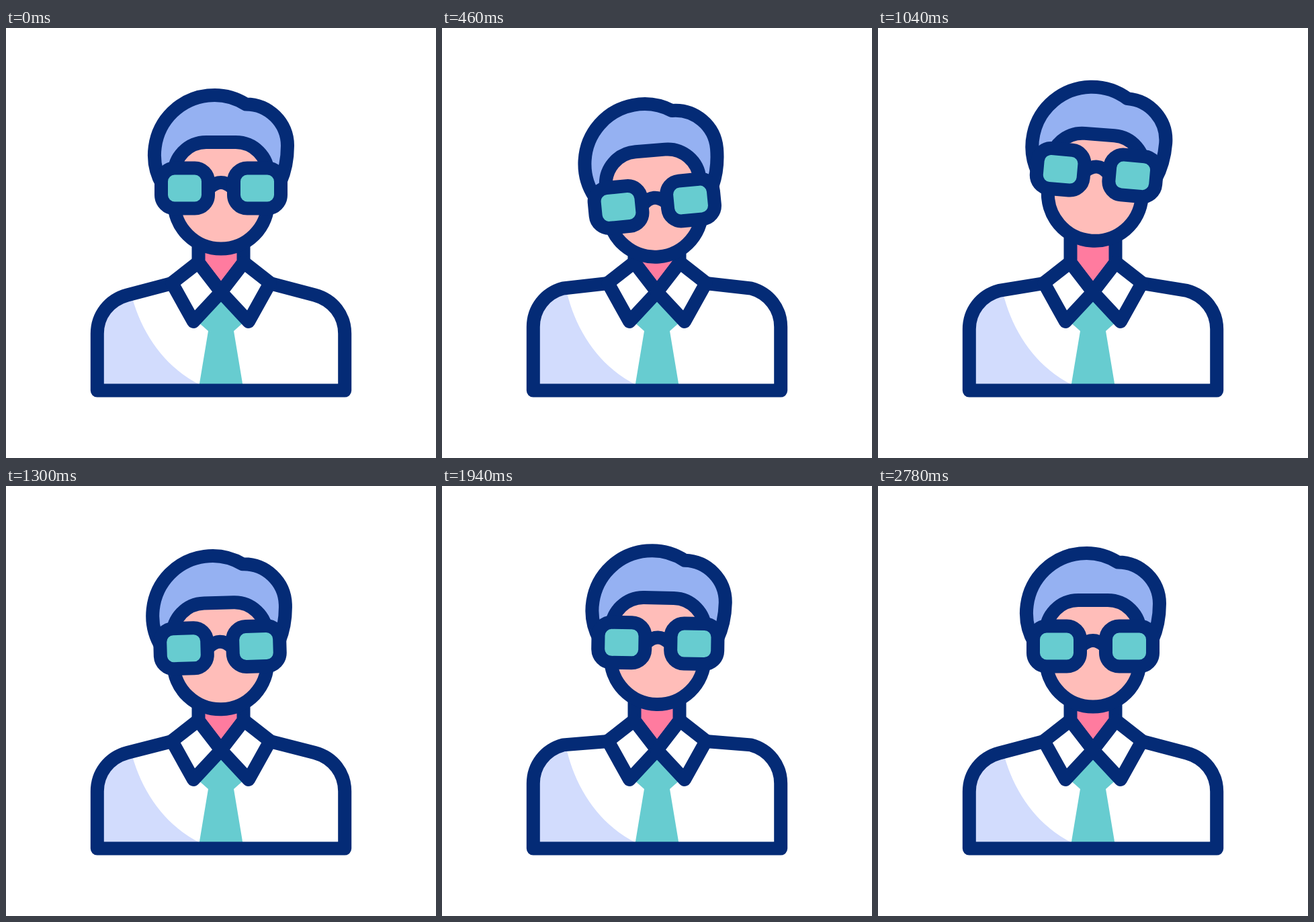
These frames come from a looping animation (640x640 px, 3.6 s). An HTML page:

```html
<!DOCTYPE html>
<html lang="en">
<head>
<meta charset="utf-8">
<title>Man with glasses</title>
<style>
html, body { margin: 0; width: 100%; height: 100%; overflow: hidden; background: #fff; }
svg { display: block; width: 100vw; height: 100vh; }
.line { stroke: #042b76; stroke-width: 20; stroke-linecap: round; stroke-linejoin: round; }
</style>
</head>
<body>
<svg viewBox="0 0 640 640">
  <defs>
    <clipPath id="clip"><path id="bodyClip"/></clipPath>
  </defs>
  <path fill="#d2dcfd" clip-path="url(#clip)" d="M184 385C196 445 232 504 291 532V545H130V385Z"/>
  <path fill="#67ccd0" d="M320 393L284 436L301 451L287 535H353L339 451L356 436Z"/>
  <path id="body" class="line" fill="none"/>
  <path class="line" fill="#ff7b9f" d="M286.5 300V349L320 393L353.5 349V300"/>
  <path class="line" fill="#fff" d="M286 349L247 379.5L279 437L320 393Z"/>
  <path class="line" fill="#fff" d="M354 349L393 379.5L361 437L320 393Z"/>
  <g id="head">
    <path class="line" fill="#95b1f2" d="M233.2 234A89 89 0 0 1 357 113.4A62 62 0 0 1 419 175C419 198 415 214 408 230"/>
    <path class="line" fill="#ffbdb9" d="M250 218A48 48 0 0 1 298 170H342A48 48 0 0 1 390 218V258.5A70 70 0 0 1 250 258.5Z"/>
    <g id="glasses" class="line" fill="#67ccd0">
      <path fill="none" d="M304 237Q320 223 336 237"/>
      <rect x="231" y="208.5" width="70" height="60" rx="20"/>
      <rect x="339" y="208.5" width="70" height="60" rx="20"/>
    </g>
  </g>
</svg>
<script>
const LOOP = 3600, BREATH = 1385;
const get = id => document.getElementById(id);

// Eases from peak to peak, one per step, starting and ending at rest.
function swing(t, step, ...peaks) {
  const x = Math.max(t, 0) / step, i = Math.floor(x);
  const a = peaks[i - 1] || 0, b = peaks[i] || 0;
  return a + (b - a) * (1 - Math.cos(Math.PI * (x - i))) / 2;
}

const nod = t => swing(t, 500, -1, 1, -1, 0.33);
const wobble = t => swing(t, 562, -1, 0.6, -3, 3);
const breath = t => t < 2 * BREATH ? (1 - Math.cos(2 * Math.PI * t / BREATH)) / 2 : 0;

function shirt(lift) {
  const y = n => n - lift;
  return `M247 380L180.5 ${y(397.5)}C153 ${y(405)} 135.8 ${y(428)} 135.8 ${y(455)}V539.6H504.2` +
    `V${y(455)}C504.2 ${y(428)} 487 ${y(405)} 459.5 ${y(397.5)}L393 380`;
}

function move(id, y, angle, pivotY) {
  get(id).setAttribute('transform', `translate(0 ${y}) rotate(${angle} 320 ${pivotY})`);
}

function draw(t) {
  const d = shirt(13.4 * breath(t));
  get('body').setAttribute('d', d);
  get('bodyClip').setAttribute('d', d);
  move('head', -12.2 * nod(t), 4.7 * nod(t), 295);
  // The glasses follow the head a little late.
  move('glasses', -12.2 * nod(t - 80), wobble(t), 238.5);
}

const start = performance.now();
function frame() {
  draw((performance.now() - start) % LOOP);
  requestAnimationFrame(frame);
}
frame();
</script>
</body>
</html>
```
